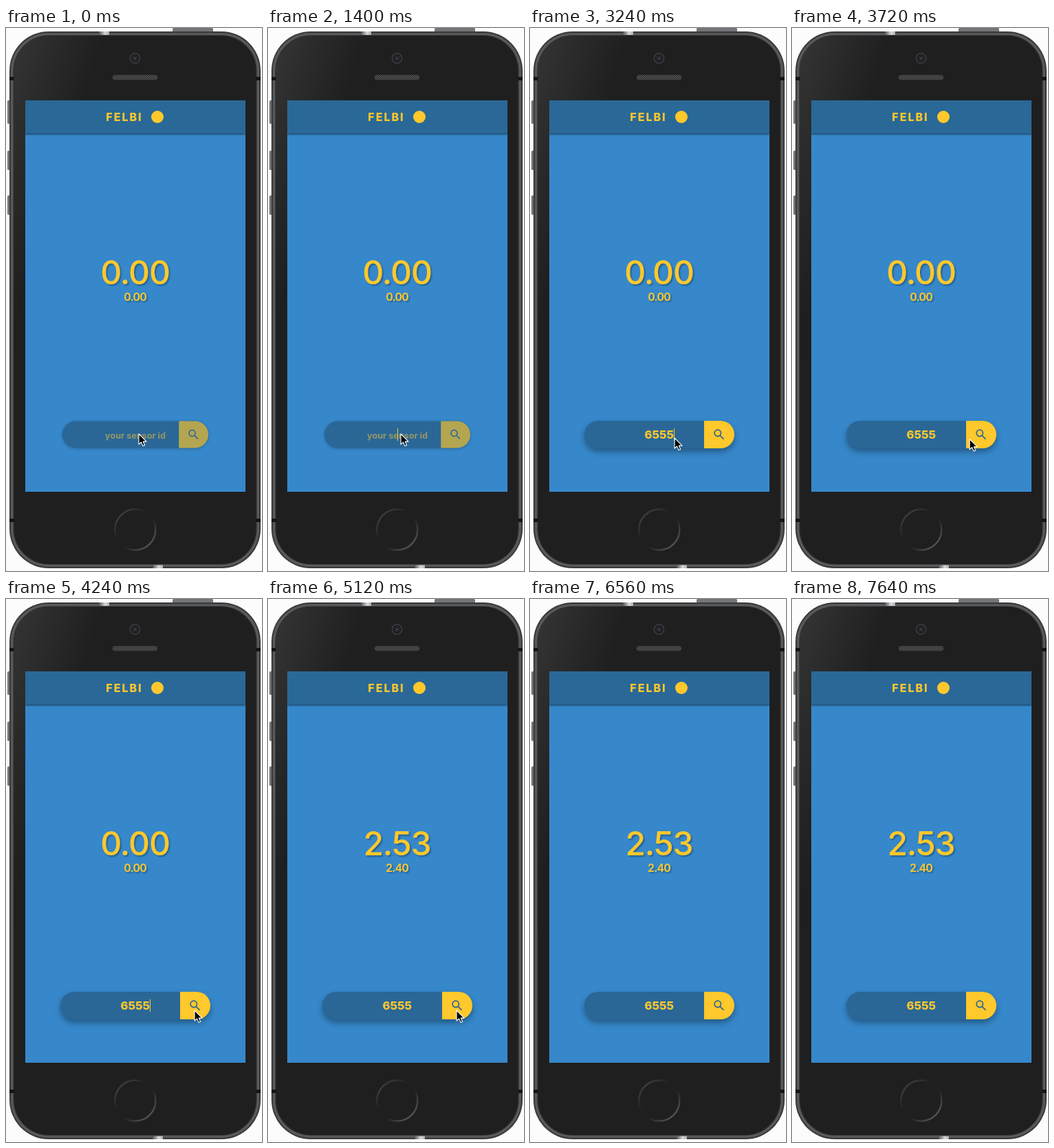
These frames come from a looping animation (372 px wide and 788 px high, 7680 ms). An HTML page:

```html
<!DOCTYPE html>
<html lang="en">
<head>
<meta charset="utf-8">
<title>Air sensor</title>
<style>
  html, body { margin: 0; width: 100%; height: 100%; overflow: hidden; background: #fcfcfc; }
  svg { display: block; width: 372px; height: 788px; }
  text { font-family: Inter, Roboto, sans-serif; fill: #ffc82c; text-anchor: middle; }
  .value { font-weight: 500; filter: url(#textShadow); }
  #main { letter-spacing: -1.1px; }
  #sub { font-weight: 600; letter-spacing: -.8px; }
</style>
</head>
<body>
<svg viewBox="0 0 372 788" xmlns="http://www.w3.org/2000/svg">
  <defs>
    <linearGradient id="gloss" gradientUnits="userSpaceOnUse" x1="8" y1="20" x2="128" y2="58">
      <stop offset="0" stop-color="#353535"/><stop offset=".45" stop-color="#2b2b2b"/><stop offset="1" stop-color="#1f1f1f"/>
    </linearGradient>
    <linearGradient id="ring" x1="0" y1="0" x2="1" y2="1">
      <stop offset="0" stop-color="#4c4c4c"/><stop offset=".4" stop-color="#1f1f1f"/>
      <stop offset=".58" stop-color="#1f1f1f"/><stop offset="1" stop-color="#6c6c6c"/>
    </linearGradient>
    <linearGradient id="shine">
      <stop offset="0" stop-color="#54565a"/><stop offset=".6" stop-color="#d8d8da"/><stop offset="1" stop-color="#b0b0b3"/>
    </linearGradient>
    <pattern id="mesh" width="3" height="3" patternUnits="userSpaceOnUse">
      <rect width="3" height="3" fill="#303030"/>
      <path d="M0 0L3 3M3 0L0 3" stroke="#5c5c5c" stroke-width=".7"/>
    </pattern>
    <filter id="textShadow" x="-20%" y="-30%" width="140%" height="170%">
      <feDropShadow dx="2" dy="2" stdDeviation="1" flood-color="#000" flood-opacity=".3"/>
    </filter>
    <filter id="soft" x="-20%" y="-80%" width="140%" height="260%"><feGaussianBlur id="blur" stdDeviation="2"/></filter>
    <filter id="barShadow" x="-5%" y="-20%" width="110%" height="150%">
      <feDropShadow dx="0" dy="1.5" stdDeviation="1" flood-color="#000" flood-opacity=".5"/>
    </filter>
    <clipPath id="screen"><rect x="28" y="105" width="320" height="568"/></clipPath>
  </defs>

  <!-- phone -->
  <rect width="372" height="788" fill="#fcfcfc"/>
  <rect x="242" y="0" width="59" height="8" rx="1.5" fill="#737578"/>
  <g fill="#737578">
    <rect x="2" y="105" width="7" height="34" rx="1.5"/>
    <rect x="2" y="178" width="7" height="28" rx="1.5"/>
    <rect x="2" y="243" width="7" height="28" rx="1.5"/>
  </g>
  <rect x="5" y="5" width="365" height="779" rx="57" fill="#3a3b3d"/>
  <rect x="8.7" y="8.7" width="357.6" height="771.6" rx="53.5" fill="none" stroke="#585a5c" stroke-width="3"/>
  <rect x="135" y="5" width="15" height="5" fill="url(#shine)"/>
  <rect x="213" y="779.5" width="15" height="4.5" fill="url(#shine)"/>
  <g fill="#151515">
    <rect x="5" y="71" width="7" height="5"/><rect x="363" y="71" width="7" height="5"/>
    <rect x="5" y="712" width="7" height="5"/><rect x="363" y="712" width="7" height="5"/>
  </g>
  <rect x="11.5" y="11" width="352" height="767" rx="51" fill="#1f1f1f"/>
  <path d="M11.5 480V62A51 51 0 0 1 62.5 11H180Z" fill="url(#gloss)"/>
  <circle cx="187.5" cy="44" r="8" fill="#38383a"/>
  <circle cx="187.5" cy="44" r="6" fill="#19191b"/>
  <circle cx="187.5" cy="44" r="3.6" fill="#1e1f24" stroke="#35363c"/>
  <circle cx="187.5" cy="44" r="1.2" fill="#555766"/>
  <rect x="155" y="68.5" width="65" height="6.5" rx="3.2" fill="url(#mesh)" stroke="#444" stroke-width=".6"/>
  <circle cx="187.8" cy="728" r="29.5" fill="none" stroke="url(#ring)" stroke-width="2.4"/>

  <!-- app -->
  <g clip-path="url(#screen)">
    <rect x="28" y="105" width="320" height="568" fill="#3688cb"/>
    <rect x="28" y="95" width="320" height="58" fill="#2a6797" filter="url(#barShadow)"/>
    <text x="172" y="135" font-size="16" font-weight="800" letter-spacing="2">FELBI</text>
    <circle cx="220" cy="129" r="9" fill="#ffc82c"/>
    <text id="main" class="value" x="187.5" y="371.5" font-size="48">0.00</text>
    <text id="sub" class="value" x="187.6" y="396" font-size="16">0.00</text>

    <g id="pill">
      <rect id="shadow" x="-109" y="-20" width="218" height="40" rx="20" fill="#000" filter="url(#soft)"/>
      <rect x="-109" y="-20" width="218" height="40" rx="20" fill="#2a6797"/>
      <g id="button">
        <path d="M65-20H89A20 20 0 0 1 89 20H65Z" fill="#ffc82c"/>
        <g transform="translate(76.7 -10.2) scale(.85)" fill="none" stroke="#2a6797" stroke-width="2">
          <circle cx="9.5" cy="9.5" r="5.5"/><path d="M13.5 13.5L19.7 19.7"/>
        </g>
      </g>
      <text id="hint" x="0" y="5.8" font-size="13" font-weight="700" opacity=".5">your sensor id</text>
    </g>
    <text id="typed" x="187.7" y="596" font-size="16.6" font-weight="800"></text>
    <rect id="caret" y="581" width="1" height="18" fill="#ffc82c"/>
  </g>
  <path id="cursor" d="M0 0V15.2L3.5 12L6 17.6L8.6 16.4L6.2 11.1H11Z" fill="#000" stroke="#fff" stroke-width="1.1" stroke-linejoin="round"/>
</svg>
<script>
  const LOOP = 7680;
  const FOCUS = 1240, GROW = 2320, CLICK = 4560, LOADED = 4960;
  const KEYS = [2320, 2480, 2680, 2880];
  const ID = "6555";
  // time, x, y of the pointer
  const PATH = [[0, 193, 589], [3120, 193, 589], [3240, 210, 595], [3880, 274, 597],
                [5720, 274, 597], [5880, 289, 595], [6280, 374, 582]];

  const el = {};
  document.querySelectorAll("[id]").forEach(n => el[n.id] = n);
  const clamp = v => Math.min(1, Math.max(0, v));
  const smooth = v => v * v * (3 - 2 * v);
  const show = (node, on) => node.setAttribute("visibility", on ? "visible" : "hidden");
  const label = (node, s) => { if (node.textContent !== s) node.textContent = s; };

  function pointer(t) {
    let i = 0;
    while (i < PATH.length - 2 && t >= PATH[i + 1][0]) i++;
    const [t0, x0, y0] = PATH[i], [t1, x1, y1] = PATH[i + 1];
    const k = clamp((t - t0) / (t1 - t0));
    return [x0 + (x1 - x0) * k, y0 + (y1 - y0) * k];
  }

  function draw(t) {
    const count = KEYS.filter(k => t >= k).length;
    const grow = smooth(clamp((t - GROW) / 340));
    const scale = 0.973 + 0.027 * grow;

    el.pill.setAttribute("transform", `translate(188 590) scale(${scale})`);
    el.shadow.setAttribute("transform", `translate(0 ${1 + 4 * grow})`);
    el.shadow.setAttribute("opacity", 0.25 + 0.1 * grow);
    el.blur.setAttribute("stdDeviation", 2 + 3 * grow);
    el.button.setAttribute("opacity", 0.65 + 0.35 * grow);
    show(el.hint, !count);
    label(el.typed, ID.slice(0, count));

    const since = count ? KEYS[count - 1] : FOCUS;
    show(el.caret, t >= FOCUS && t < CLICK && (t - since) % 1000 < 500);
    const half = count ? el.typed.getComputedTextLength() / 2 : 0;
    el.caret.setAttribute("x", Math.round(188 + half));

    label(el.main, t < LOADED ? "0.00" : "2.53");
    label(el.sub, t < LOADED ? "0.00" : "2.40");

    const [x, y] = pointer(t);
    el.cursor.setAttribute("transform", `translate(${x} ${y})`);
    show(el.cursor, (t < GROW || t >= 3120) && t < 6280);
  }

  const start = performance.now();
  function tick() {
    draw((performance.now() - start) % LOOP);
    requestAnimationFrame(tick);
  }
  tick();
</script>
</body>
</html>
```
